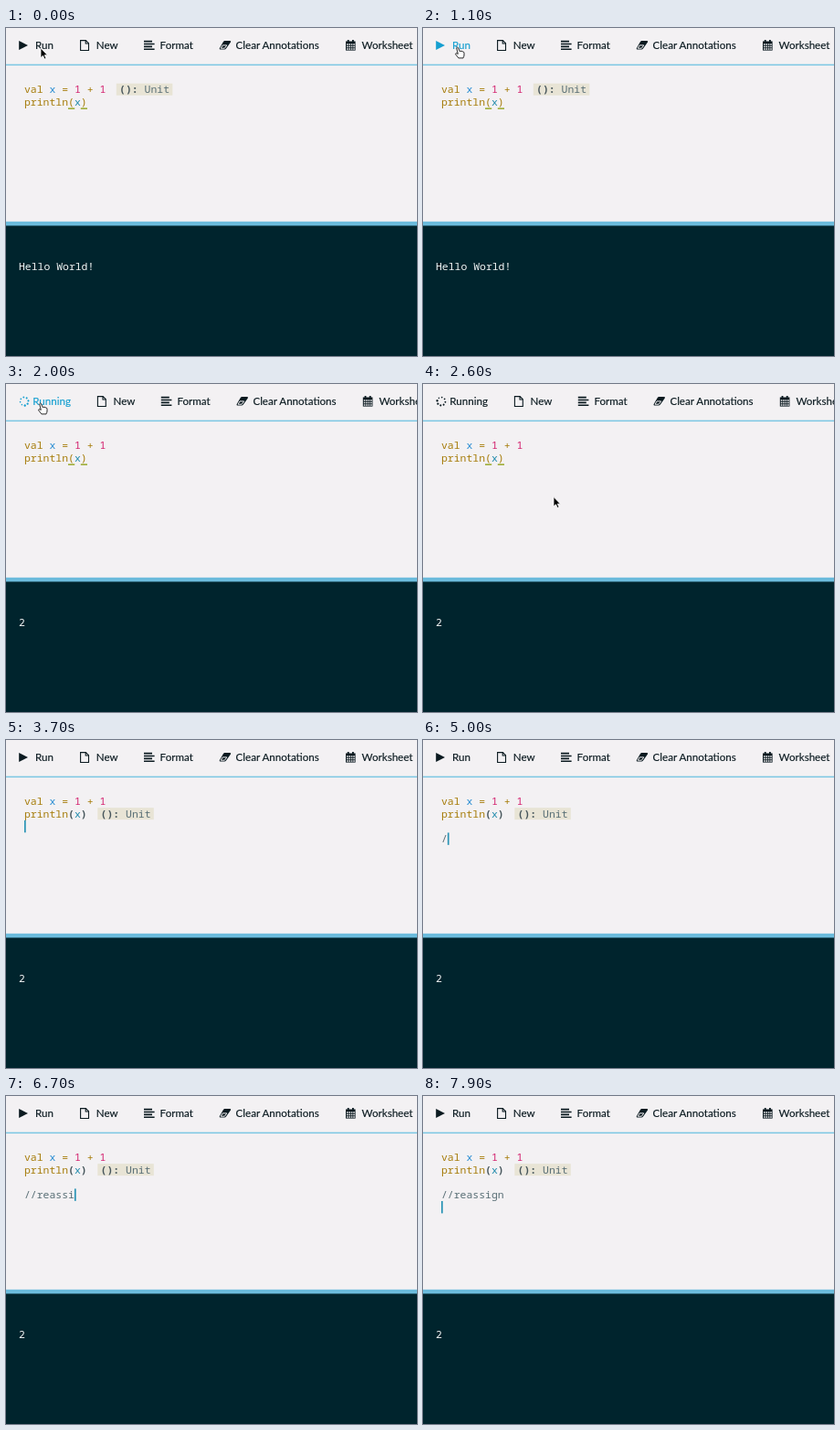
Recreate the animation shown at these times as an HTML page. Size 450 px wide and 359 px high, loop 8000 ms.

```html
<!DOCTYPE html>
<html lang="en">
<head>
<meta charset="utf-8">
<title>Scala editor</title>
<style>
  html, body { margin: 0; width: 100%; height: 100%; overflow: hidden; background: #f3f1f3; }
  svg { display: block; width: 450px; height: 359px; }
  text { white-space: pre; }
  .bar text { font: 11.6px Lato, sans-serif; fill: currentColor; stroke: currentColor; stroke-width: .15; }
  .mono text { font: 11.45px "Noto Sans Mono", "DejaVu Sans Mono", monospace; font-variant-ligatures: none; }
  .bar { color: #0b1a20; }
  .icon { fill: currentColor; }
  .line { fill: none; stroke: currentColor; }
  .kw { fill: #a67c0a; }
  .id { fill: #268bd2; }
  .num { fill: #d3216e; }
  .ref { fill: #1f8aac; }
  .grey { fill: #586e75; }
  .bold { fill: #46555b; font-weight: 700; }
</style>
</head>
<body>
<svg viewBox="0 0 450 359">
  <rect width="450" height="359" fill="#f3f1f3"/>
  <g class="bar">
    <g id="run">
      <path id="play" class="icon" d="M14.2 14 24 19 14.2 24Z"/>
      <g id="spinner" class="icon"></g>
      <text id="runLabel" y="23"></text>
    </g>
    <g id="menu">
      <path class="line" stroke-width="1.1" d="M81.6 13.6H87.4L90.5 16.7V24.5H81.6ZM87.2 13.8V17H90.4"/>
      <text x="98.8" y="23">New</text>
      <path class="line" stroke-width="1.6" d="M151 14.6h9M151 17.5h11.6M151 20.4h9M151 23.3h11.6"/>
      <text x="168.6" y="23">Format</text>
      <path class="icon" d="M239.2 14H245.4Q246.6 14.2 246 15.4L240.8 22.8Q240.2 23.6 239.2 23.6H234.4Q233.2 23.2 233.9 22.1L238.1 14.7Z"/>
      <path class="line" style="stroke:#f3f1f3" d="M235.2 22.2H239.4L241.8 18.9H237.2Z"/>
      <text x="251.6" y="23">Clear Annotations</text>
      <path class="icon" d="M372 14.5H382.6V24.6H372Z"/>
      <path class="line" stroke-width="1.8" d="M374.7 12.9v3M379.9 12.9v3"/>
      <path class="line" style="stroke:#f3f1f3" stroke-width="1.5" stroke-dasharray="1.6 .8" d="M373 18.1h8.8M373 20.6h8.8M373 23h8.8"/>
      <text x="389.6" y="23">Worksheet</text>
    </g>
  </g>
  <rect y="39.6" width="450" height="1.5" fill="#7cc6e3"/>

  <g class="mono">
    <text x="20" y="71.2"><tspan class="kw">val</tspan> <tspan class="id">x</tspan> <tspan class="kw">=</tspan> <tspan class="num">1</tspan> <tspan class="kw">+</tspan> <tspan class="num">1</tspan></text>
    <text x="20" y="84.8"><tspan class="kw">println</tspan><tspan class="paren">(</tspan><tspan class="ref">x</tspan><tspan class="paren">)</tspan></text>
    <path id="match" d="M68 88.2h7.2M81.8 88.2h7.2" stroke="#859900" stroke-width="1.3"/>
    <g id="note">
      <rect width="61.5" height="13" fill="#e8e4d5"/>
      <text x="3.3" y="10.6" class="grey"><tspan class="bold">():</tspan> Unit</text>
    </g>
    <text id="typed" class="grey" x="20" y="112"></text>
    <path id="spell" d="M34 115.3h13.5" stroke="#e2a9ae" stroke-dasharray="1 1"/>
    <rect id="caret" width="1.7" height="13.4" fill="#2a94b5"/>
  </g>

  <rect y="216" width="450" height="143" fill="#00242d"/>
  <rect y="211.8" width="450" height="4.6" fill="#6bbbdc"/>
  <g id="console" class="mono" fill="#f6f8f8"></g>

  <path id="arrow" fill="#000" stroke="#fff" stroke-width=".8" d="M0 0V10.6L2.5 8.3 4.1 12 5.9 11.2 4.3 7.7H7.4Z"/>
  <path id="hand" fill="#fff" stroke="#111" stroke-width=".9" stroke-linejoin="round"
    d="M36.7 21.8Q37.5 20.3 38.6 21.7L40.2 25.6Q41.2 24.6 42 25.6 43.1 24.8 43.7 26 44.8 25.8 45 27.2L45 30Q44.8 31.4 44 32.9H38.9L36 29.2Q35.1 27.7 36.4 27.4L38.3 28.4Z"/>
</svg>
<script>
const LOOP = 8000, CHAR = 6.87, LEFT = 20, ROW = 13.55;
const START = 1300, DONE = 2700;
const $ = id => document.getElementById(id);
const show = (id, on) => $(id).setAttribute("visibility", on ? "visible" : "hidden");
const move = (id, x, y) => $(id).setAttribute("transform", `translate(${x} ${y})`);
const at = (steps, t) => steps.filter(s => s[0] <= t).pop()[1];

const comment = "//reassign";
const keys = [5000, 5200, 5500, 5700, 6000, 6200, 6400, 6600, 6800, 6900];
const log = [
  "scastie: Sending task to the server.",
  "scastie: Connected. Waiting for sbt",
  "sbt: [info] Compiling 1 Scala source to /tmp/scastie668224284633"
];
const output = [
  [0, ["Hello World!"]],
  [START, log.slice(0, 1)],
  [1400, log.slice(0, 2)],
  [1500, log],
  [2000, ["2"]]
];
// Caret row; -1 hides it.
const caretRow = [[0, -1], [2900, 1], [3500, 2], [4000, 3], [4600, -1], [5000, 3], [7400, -1], [7800, 4]];

$("spinner").innerHTML = Array.from({ length: 8 }, (_, i) => {
  const a = i * Math.PI / 4;
  return `<circle cx="${4.5 * Math.cos(a)}" cy="${4.5 * Math.sin(a)}" r="${0.75 + i * 0.06}"/>`;
}).join("");
$("console").innerHTML = log.map((_, i) => `<text x="14" y="${264.5 + 13 * i}"></text>`).join("");

function render(t) {
  const running = t >= START && t < DONE;
  show("play", !running);
  show("spinner", running);
  $("spinner").setAttribute("transform", `translate(20 19) rotate(${(t - START) * 0.18})`);
  $("runLabel").textContent = running ? "Running" : "Run";
  $("runLabel").setAttribute("x", running ? 29.3 : 32);
  $("run").style.color = t >= 100 && t < 2250 ? "#159fd0" : "";
  move("menu", running ? 18.8 : 0, 0);

  const lines = at(output, t);
  [...$("console").children].forEach((el, i) => el.textContent = lines[i] || "");

  show("note", !running);
  move("note", t < START ? 120.8 : 100.3, t < START ? 60.7 : 74.2);
  const matched = t < 3500;
  show("match", matched);
  document.querySelectorAll(".paren").forEach(el =>
    el.setAttribute("class", "paren " + (matched ? "kw" : "bold")));

  const typed = keys.filter(k => k <= t).length;
  $("typed").textContent = comment.slice(0, typed);
  show("spell", t >= 5700 && t < 6000);
  const row = at(caretRow, t);
  const col = row === 1 ? 10 : row === 3 ? typed : 0;
  show("caret", row >= 0);
  move("caret", LEFT + col * CHAR, 60.8 + row * ROW);

  const hover = t >= 100 && t < 2200;
  show("hand", hover);
  show("arrow", !hover && t < 3500);
  const p = Math.min(1, Math.max(0, (t - 2200) / 400));
  const e = p * p * (3 - 2 * p);
  move("arrow", 38 + 105 * e, 22 + 101.5 * e);
}

const t0 = performance.now();
function tick() {
  render((performance.now() - t0) % LOOP);
  requestAnimationFrame(tick);
}
tick();
</script>
</body>
</html>
```
